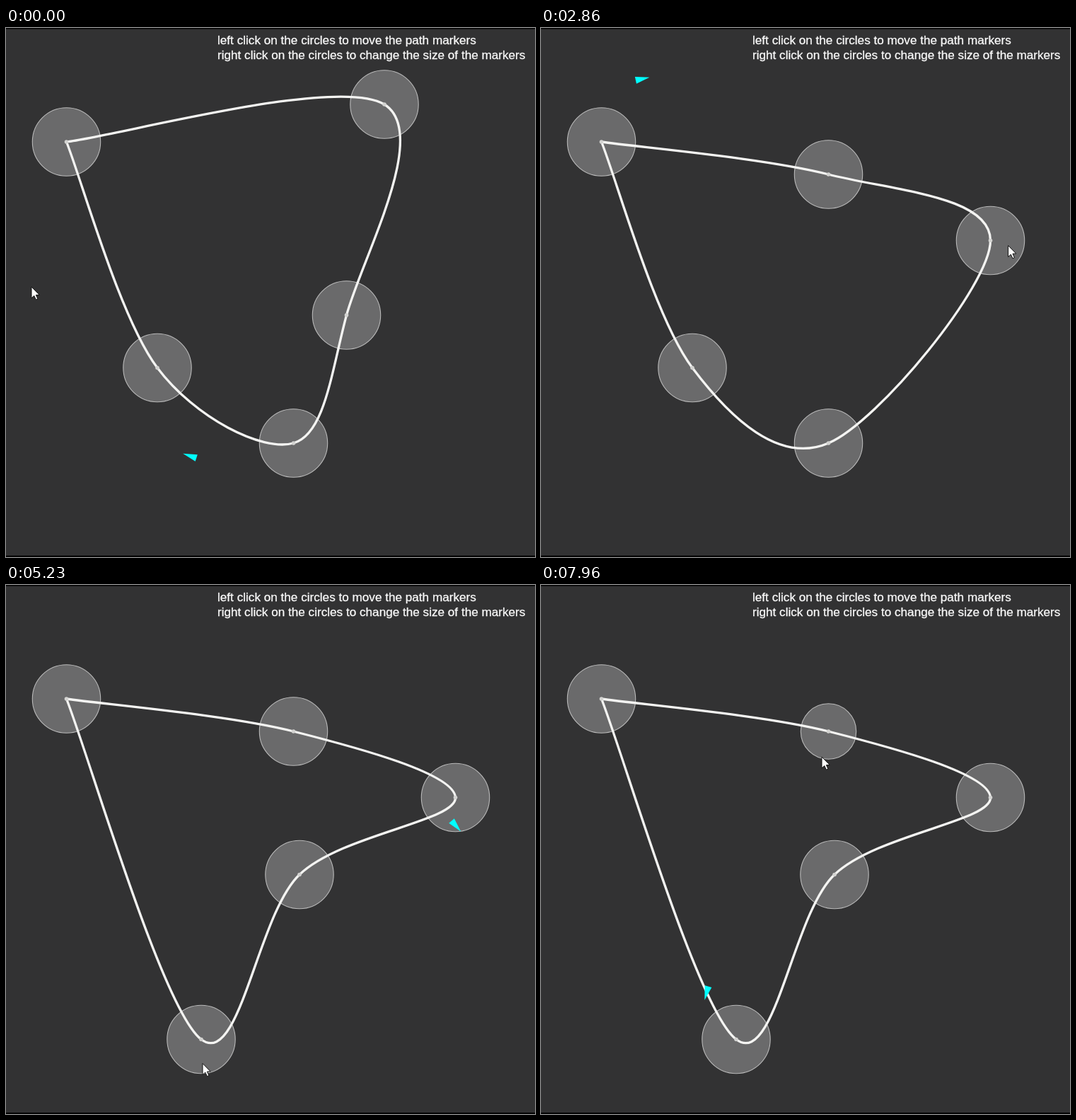
These frames come from a looping animation (748x748 px, 8 s). An HTML page with a canvas:

```html
<!DOCTYPE html>
<html lang="en">
<head>
<meta charset="utf-8">
<title>Path markers</title>
<style>
html, body { margin: 0; width: 100%; height: 100%; overflow: hidden; background: #323233; }
canvas { display: block; width: 748px; height: 748px; }
</style>
</head>
<body>
<canvas id="stage" width="748" height="748"></canvas>
<script>
const ctx = document.getElementById('stage').getContext('2d');
const LOOP = 8000;
const RADIUS = 48.2;
const LAG = 0.07;   // seconds a dragged marker trails the pointer
const REST = 0.1;   // pause of the pointer before a drag

const home = [[85.5, 161], [535, 108], [481.5, 406], [406.5, 587], [214, 480.5]];
const pointerStart = [36, 366];

// Times in seconds; bow bends the way sideways, glide is the pointer's approach.
const drags = [
  { marker: 1, from: home[1], to: [406.5, 207], start: 1.11, time: 0.7, bow: 0, grip: [-25.5, 30.7], glide: 0.8 },
  { marker: 2, from: home[2], to: [635.5, 300.5], start: 2.04, time: 0.7, bow: 17, grip: [30.7, 0], glide: 0.18 },
  { marker: 3, from: home[3], to: [415, 409.5], start: 3.37, time: 0.41, bow: 10.4, grip: [7, 32], glide: 0.45 },
  { marker: 4, from: home[4], to: [276, 642.5], start: 4.373, time: 0.85, bow: 9.6, grip: [2, 34], glide: 0.4 }
];
const resize = { from: [403, 247], to: [397, 243], start: 6.61, time: 1.35, bow: 0, grip: [0, 0], glide: 1 };

// Key points of the vehicle's flight: [seconds, x, y]
const flight = [
  [0, 260, 605], [0.5, 176, 550], [1.3, 157.5, 383], [2, 109, 205], [2.26, 100, 142],
  [2.6, 112, 89], [3, 166, 69], [3.6, 297.5, 100], [4.63, 520, 256], [5.1, 619, 323],
  [5.55, 658, 381], [6.36, 543.5, 436.5], [7.1, 378, 436], [7.5, 289, 485], [7.96, 234, 577]
];

const clamp = v => Math.min(1, Math.max(0, v));
const ease = v => { const u = clamp(v); return u * u * (3 - 2 * u); };
const mix = (a, b, e) => [a[0] + (b[0] - a[0]) * e, a[1] + (b[1] - a[1]) * e];
const add = (a, b) => [a[0] + b[0], a[1] + b[1]];

function dragAt(d, t) {
  const e = ease((t - d.start) / d.time);
  const dx = d.to[0] - d.from[0], dy = d.to[1] - d.from[1];
  const side = d.bow * 4 * e * (1 - e) / Math.hypot(dx, dy);
  return add(mix(d.from, d.to, e), [-dy * side, dx * side]);
}

function pointerAt(t) {
  let pos = pointerStart;
  for (const d of [...drags, resize]) {
    const arrive = d.start - REST;
    if (t < arrive) return mix(pos, add(d.from, d.grip), ease((t - arrive + d.glide) / d.glide));
    pos = add(dragAt(d, t + LAG), d.grip);
  }
  return pos;
}

function markersAt(t) {
  const pts = [...home];
  for (const d of drags) pts[d.marker] = dragAt(d, t);
  return pts;
}

// Velocity of the flight at key i, weighted by the neighbouring intervals.
function velocity(i, axis) {
  const rate = j => (flight[j + 1][axis] - flight[j][axis]) / (flight[j + 1][0] - flight[j][0]);
  const end = flight.length - 1;
  if (i === 0) return 2 * rate(0) - velocity(1, axis);
  if (i === end) return 2 * rate(end - 1) - velocity(end - 1, axis);
  const h0 = flight[i][0] - flight[i - 1][0], h1 = flight[i + 1][0] - flight[i][0];
  return (rate(i - 1) * h1 + rate(i) * h0) / (h0 + h1);
}

function vehicleAt(t) {
  let i = 0;
  while (i < flight.length - 2 && flight[i + 1][0] <= t) i++;
  const a = flight[i], b = flight[i + 1], h = b[0] - a[0], u = (t - a[0]) / h;
  const e = u * u * (3 - 2 * u);
  return [1, 2].map(axis => a[axis] + (b[axis] - a[axis]) * e
    + h * u * (1 - u) * ((1 - u) * velocity(i, axis) - u * velocity(i + 1, axis)));
}

function disc([x, y], r) {
  ctx.beginPath();
  ctx.arc(x, y, r, 0, Math.PI * 2);
  ctx.fill();
}

function polygon(points) {
  ctx.beginPath();
  points.forEach(p => ctx.lineTo(...p));
  ctx.closePath();
  ctx.fill();
}

// Catmull-Rom loop with a corner at the first marker.
function drawPath(pts) {
  const p = [pts[0], ...pts, pts[0], pts[0]];
  ctx.beginPath();
  ctx.moveTo(...p[1]);
  for (let i = 1; i < p.length - 2; i++) {
    const [a, b, c, d] = p.slice(i - 1, i + 3);
    ctx.bezierCurveTo(
      b[0] + (c[0] - a[0]) / 6, b[1] + (c[1] - a[1]) / 6,
      c[0] - (d[0] - b[0]) / 6, c[1] - (d[1] - b[1]) / 6, ...c);
  }
  ctx.strokeStyle = '#f4f4f2';
  ctx.lineWidth = 3.3;
  ctx.lineJoin = 'round';
  ctx.stroke();
}

function drawVehicle(t) {
  const a = vehicleAt(t - 0.005), b = vehicleAt(t + 0.005);
  ctx.save();
  ctx.translate(...vehicleAt(t));
  ctx.rotate(Math.atan2(b[1] - a[1], b[0] - a[0]));
  ctx.fillStyle = '#00ffff';
  polygon([[10.3, 0], [-9.7, -5], [-9.7, 5]]);
  ctx.restore();
}

function drawPointer(t) {
  ctx.save();
  ctx.translate(...pointerAt(t));
  ctx.fillStyle = '#fff';
  polygon([[0, 0], [0, 16], [3.8, 12.6], [6.4, 18.2], [8.9, 17], [6.4, 11.6], [11.2, 11.4]]);
  ctx.strokeStyle = '#111';
  ctx.lineWidth = 1;
  ctx.stroke();
  ctx.restore();
}

function drawText() {
  ctx.font = '17.15px "Liberation Sans", Arial, sans-serif';
  ctx.fillStyle = ctx.strokeStyle = '#fafafa';
  ctx.lineWidth = 0.3;
  ['left click on the circles to move the path markers',
   'right click on the circles to change the size of the markers'].forEach((line, i) => {
    ctx.fillText(line, 299, 23 + 21 * i);
    ctx.strokeText(line, 299, 23 + 21 * i);
  });
}

function draw(t) {
  ctx.fillStyle = '#323233';
  ctx.fillRect(0, 0, 748, 748);
  ctx.fillStyle = '#000';
  ctx.fillRect(0, 0, 748, 1.5);
  ctx.fillRect(0, 746, 748, 2);
  drawText();

  const pts = markersAt(t);
  const shrink = 9 * clamp((t - 7.65) / 0.3);
  pts.forEach((p, i) => {
    ctx.fillStyle = '#6a6a6b';
    disc(p, i === 1 ? RADIUS - shrink : RADIUS);
    ctx.strokeStyle = '#bababa';
    ctx.lineWidth = 1.1;
    ctx.stroke();
  });
  drawPath(pts);
  ctx.fillStyle = '#d4d4d2';
  pts.forEach(p => disc(p, 2.8));
  drawVehicle(t);
  drawPointer(t);
}

// Steps at 30 per second, aligned to 10 ms ticks.
function tick() {
  const step = Math.min(239, Math.floor((performance.now() % LOOP + 7) * 0.03));
  draw(Math.floor(step * 10 / 3) / 100);
  requestAnimationFrame(tick);
}
tick();
</script>
</body>
</html>
```
